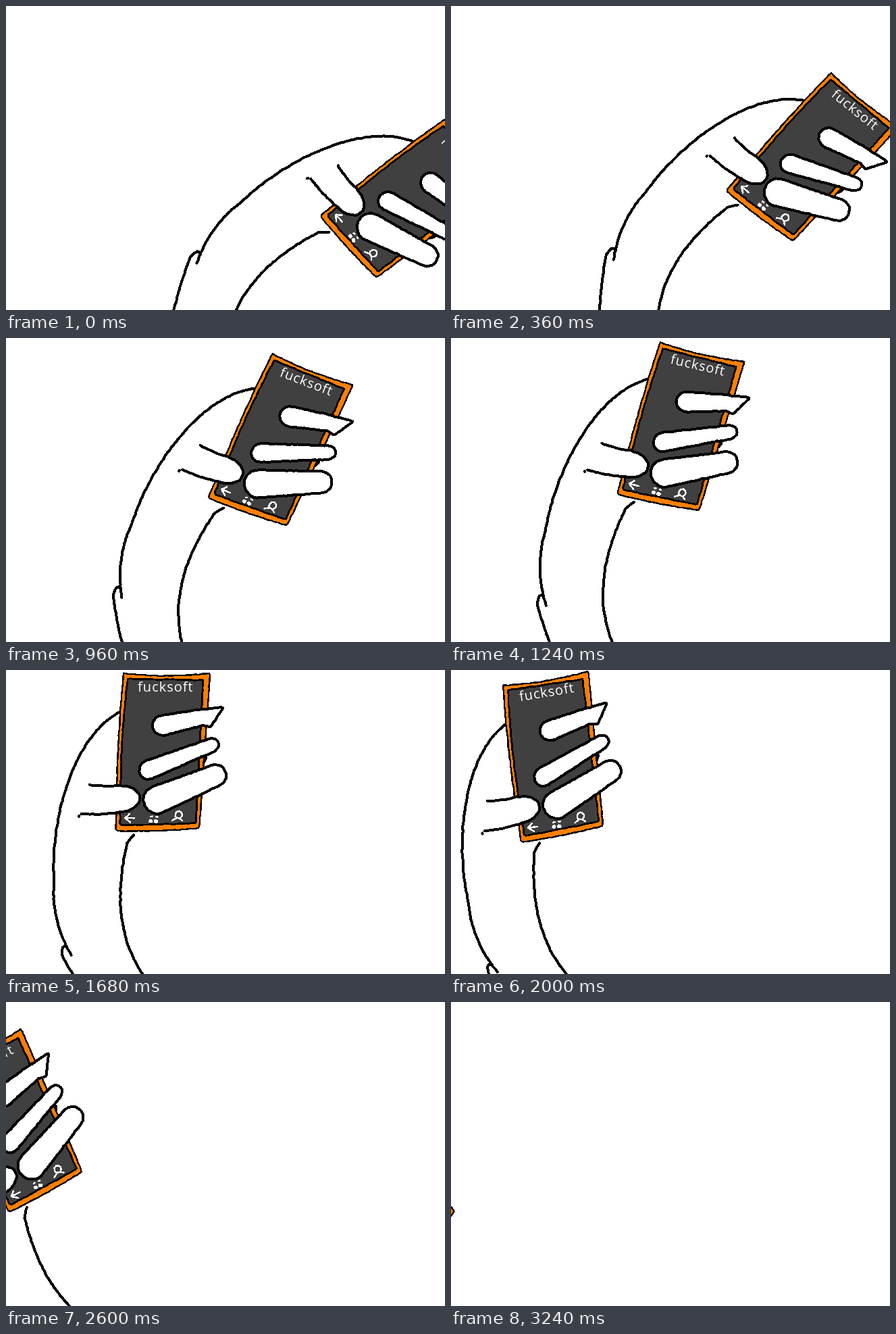
Write an HTML page that moves like this. It is 650 by 450 pixels and loops after 3.28 s.

```html
<!DOCTYPE html>
<html lang="en">
<head>
<meta charset="utf-8">
<title>Hand with phone</title>
<style>
html, body { margin: 0; width: 100%; height: 100%; overflow: hidden; background: #fff; }
svg { display: block; width: 650px; height: 450px; }
path { fill: none; stroke: #000; stroke-width: 4; stroke-linecap: round; stroke-linejoin: round; shape-rendering: crispEdges; }
.skin { fill: #fff; }
.case { fill: #ff7f00; stroke-width: 2.4; }
.screen { fill: #404040; stroke-width: 2.8; }
.ink { stroke: #fff; stroke-width: 2.5; }
.dot { stroke: #fff; stroke-width: 5.5; }
text { font: 500 20px "Open Sans", sans-serif; letter-spacing: 1px; fill: #fff; }
</style>
</head>
<body>
<svg viewBox="0 0 650 450"><g id="arm"></g></svg>
<script>
const FRAME = 40, FRAMES = 82;
const START = 49.4, STEP = 1.176;   // degrees
const PIVOT = "235 603.5";
const arm = document.getElementById("arm");

let seed = 7;
const random = () => (seed = seed * 16807 % 2147483647) / 2147483647;

function add(tag, attrs) {
  const node = document.createElementNS("http://www.w3.org/2000/svg", tag);
  for (const key in attrs) node.setAttribute(key, attrs[key]);
  arm.append(node);
  return node;
}

// Draws a path with the slight tremble of a hand.
function sketch(d, cls = "") {
  const path = add("path", { d, class: cls });
  const length = path.getTotalLength();
  const count = Math.ceil(length / 4);
  const points = Array.from({ length: count + 1 }, (_, i) => {
    const p = path.getPointAtLength(length * i / count);
    return [p.x + random() - 0.5, p.y + random() - 0.5];
  });
  path.setAttribute("d", "M" + points.join("L") + (d.endsWith("Z") ? "Z" : ""));
}

// Tapered capsule around two circles.
function finger(x1, y1, r1, x2, y2, r2) {
  const axis = Math.atan2(y2 - y1, x2 - x1);
  const open = Math.acos((r1 - r2) / Math.hypot(x2 - x1, y2 - y1));
  const on = (x, y, r, a) => [x + r * Math.cos(a), y + r * Math.sin(a)];
  const a = axis + open, b = axis - open;
  sketch(`M${on(x1, y1, r1, a)}A${r1} ${r1} 0 1 1 ${on(x1, y1, r1, b)}` +
    `L${on(x2, y2, r2, b)}A${r2} ${r2} 0 0 1 ${on(x2, y2, r2, a)}Z`, "skin");
}

// Forearm
sketch("M168,62L162,66C104,100 66,210 71,310C68,340 73,385 97,422");
sketch("M90,409Q80,406 84,424Q98,452 135,505");
sketch("M189,244L179,256 178,262C167,310 158,390 206,456");

// Phone
sketch("M174,5Q235,12 302,5L286,234Q222,240 163,238Q163,120 174,5Z", "case");
sketch("M180,13L292,15 281,227 169,230Q168,120 180,13Z", "screen");
add("text", { x: 195, y: 32 }).textContent = "fucksoft";

// Navigation icons
sketch("M190,219H176M183,213L176,219 184,226".split("M183")[0], "ink");
sketch("M183,213L176,219 184,226", "ink");
for (const x of [214, 222]) {
  sketch(`M${x},224h1`, "dot");
  sketch(`M${x},217h2`, "ink");
}
sketch("M256,209a5,5.5 0 1 1 -1,0Z", "ink");
sketch("M252,219L246,223", "ink");
sketch("M258,220L261,223", "ink");

// Thumb and fingers
sketch("M123,170Q150,173 165,171C207,170 209,206 170,210Q140,215 112,213", "skin");
sketch("M108,216v1");
finger(232, 82, 15, 290, 70, 12);
sketch("M286,59L322,55 303,84 292,82", "skin");
finger(211, 148, 14, 305, 111, 10);
sketch("M289,128L297,129 293,136");
finger(224, 192, 20.5, 310, 156, 16);

function draw() {
  const step = Math.floor(performance.now() / FRAME) % FRAMES;
  arm.setAttribute("transform", `rotate(${START - STEP * step} ${PIVOT})`);
  requestAnimationFrame(draw);
}
draw();
</script>
</body>
</html>
```
